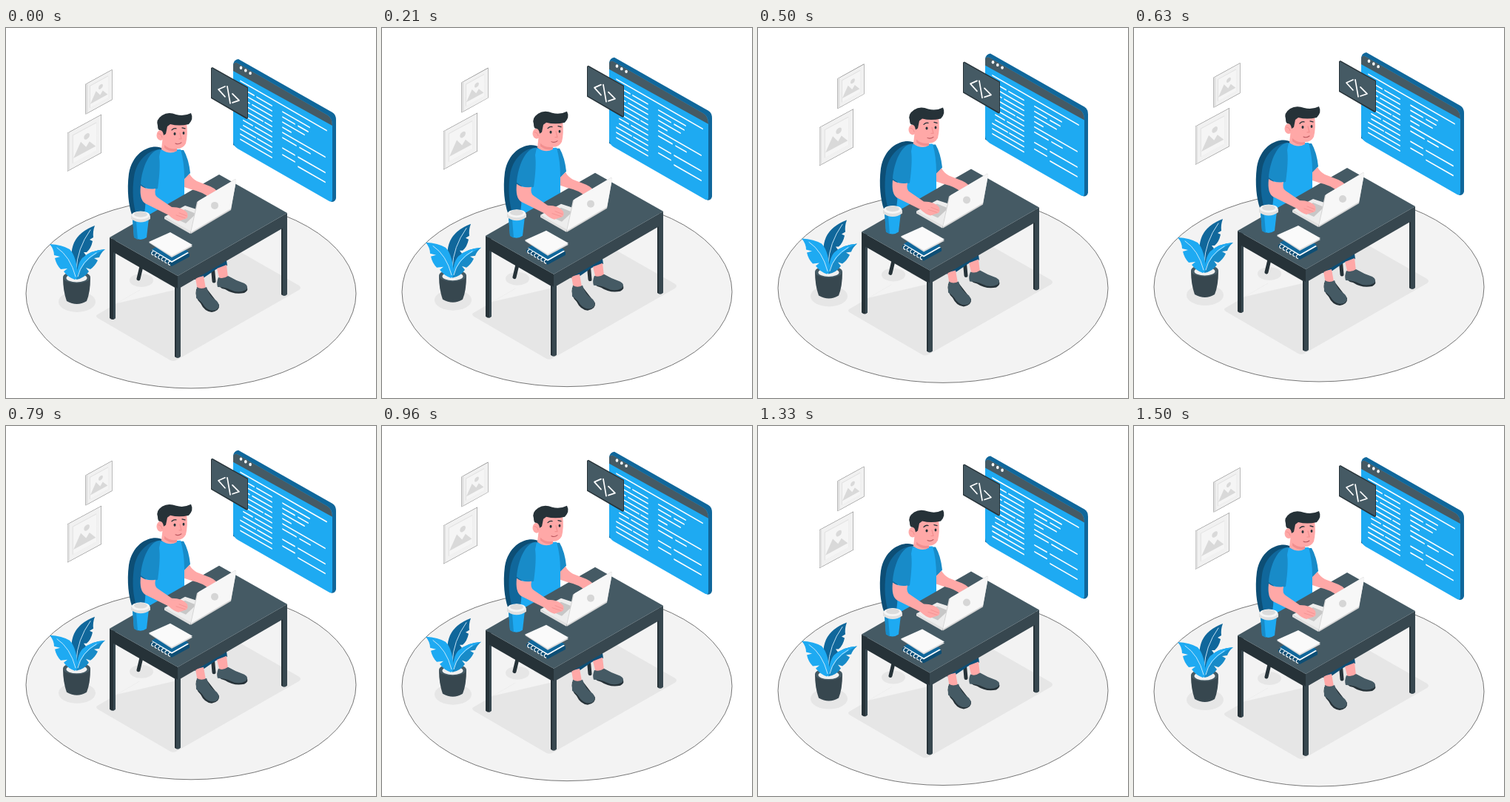
These frames come from a looping animation (500x500 px, 1.54 s). An HTML page with a canvas:

```html
<!DOCTYPE html>
<html lang="en">
<head>
<meta charset="utf-8">
<title>Desk scene</title>
<style>
html, body { margin: 0; width: 100%; height: 100%; overflow: hidden; background: #fff; }
canvas { display: block; width: 500px; height: 500px; }
</style>
</head>
<body>
<canvas id="stage" width="500" height="500"></canvas>
<script>
const ctx = document.getElementById('stage').getContext('2d');
const LOOP = 1540, STEPS = 37, RISE = 9.4, PEAK = 720;
const BLUE = '#1eaaf2', MID = '#188bc8', DEEP = '#10679b', NAVY = '#0d4e75';
const SLATE = '#455a64', DARK = '#37474f', INK = '#263238';
const SKIN = '#ffa8a7', BLUSH = '#f28f8f', SHADE = '#e6e6e6', GREY = '#e0e0e0';

function fill(color, d) {
  ctx.fillStyle = color;
  ctx.fill(new Path2D(d));
}

function line(color, width, d) {
  ctx.strokeStyle = color;
  ctx.lineWidth = width;
  ctx.lineCap = ctx.lineJoin = 'round';
  ctx.stroke(new Path2D(d));
}

function oval(color, x, y, rx, ry, turn = 0) {
  ctx.fillStyle = color;
  ctx.beginPath();
  ctx.ellipse(x, y, rx, ry, turn, 0, 2 * Math.PI);
  ctx.fill();
}

function floor() {
  oval('#f3f3f3', 250, 359, 223, 128);
  ctx.strokeStyle = '#555';
  ctx.lineWidth = 0.8;
  ctx.stroke();
  fill(SHADE, 'M124 387L288 291Q292 289 296 291L396 348Q400 351 396 354L230 449Q226 451 222 449L124 392Q120 389 124 387Z');
  fill('#f3f3f3', 'M150 372L181 354Q165 347 170 337L186 329L232 353Z');
  oval(SHADE, 183, 341, 16, 9);
  oval(SHADE, 96, 370, 25, 14);
}

// Wall picture, drawn as a sheared upright rectangle.
function picture(x, y, w, h, slope) {
  ctx.save();
  ctx.transform(1, slope, 0, 1, x, y);
  fill('#777', `M-.5 -.5H${w + .5}V${h + .5}H-.5Z`);
  fill('#f1f1f1', `M0 0H${w}V${h}H0Z`);
  fill(GREY, `M0 0H2.5V${h}H0Z`);
  const m = w * 0.14;
  fill(GREY, `M${m} ${m}H${w - m}V${h - m}H${m}Z`);
  fill('#f5f5f5', `M${m + 1} ${m + 1}H${w - m}V${h - m}H${m + 1}Z`);
  fill('#d9d9d9', `M${w * .17} ${h * .75}L${w * .39} ${h * .42}L${w * .55} ${h * .63}L${w * .65} ${h * .53}L${w * .84} ${h * .75}Z`);
  oval('#d9d9d9', w * .57, h * .36, w * .085, w * .085);
  ctx.restore();
}

const codeRows = [
  // [x, y before shear, length]
  [10, 20, 116],
  [10, 29, 18], [32, 29, 20], [10, 36, 42], [14, 43, 8], [26, 43, 26], [14, 50, 38],
  [10, 57, 30], [43, 57, 9], [10, 64, 42], [14, 71, 12], [30, 71, 22], [14, 78, 38],
  [10, 85, 20], [33, 85, 19], [10, 92, 42], [10, 99, 42],
  [67, 29, 36], [67, 36, 16], [88, 36, 13], [67, 43, 29], [67, 50, 11],
  [67, 57, 57], [67, 64, 18], [90, 64, 14], [67, 78, 16], [88, 78, 36],
  [67, 87, 16], [88, 91, 36]
];

function browser() {
  fill(DEEP, 'M307 49Q308 43 314 42L441 114Q446 117 446 124V230Q445 235 440 235L307 158Z');
  fill(BLUE, 'M307 50Q308 45 314 48L435 118Q441 122 441 131V231Q441 237 435 233L313 163Q307 159 307 153Z');
  fill(SLATE, 'M307 58V50Q308 45 314 48L435 118Q441 122 441 132Z');
  for (let i = 0; i < 3; i++) oval('#fff', 317.5 + i * 6.3, 53.8 + i * 3.7, 1.8, 2.2);
  ctx.save();
  ctx.transform(1, .575, 0, 1, 307, 46);
  for (const [x, y, length] of codeRows) line('#fff', 1.8, `M${x} ${y}h${length}`);
  ctx.restore();
  fill(INK, 'M277 54L279 53L327 80V122L325 123L277 95Z');
  fill(SLATE, 'M278 54L326 81V121.5L278 94Z');
  line('#fff', 1.7, 'M296 79L287 83L296 93M299 79L303 102M306 89L315 98L306 101');
}

function feet() {
  line(INK, 5, 'M184 318L179 339M279 320L281 342');
  fill(NAVY, 'M254 334L282 320L298 314L299 321L284 326L268 337L255 340Z');
  fill(SKIN, 'M285 325L298 320L300 337L289 341ZM256 338L267 335L270 352L259 355Z');
  fill(INK, 'M286 342Q285 351 296 353Q308 361 322 358Q329 354 325 349L301 336Z');
  fill(SLATE, 'M287 337Q293 340 300 335Q310 341 322 345Q329 349 324 354Q314 359 304 354Q296 350 286 350Q284 344 287 337Z');
  fill(INK, 'M257 353Q255 365 263 372Q268 383 278 384Q289 382 288 374L271 352Z');
  fill(SLATE, 'M258 350Q264 354 271 350Q274 362 285 369Q291 376 284 381Q275 384 268 376Q264 369 257 365Q256 357 258 350Z');
}

function chair() {
  fill(NAVY, 'M212 163C201 156 172 163 166 197C163 220 166 240 170 252L195 255V170Z');
  fill(DEEP, 'M214 165C200 160 177 174 173 201C170 221 172 239 176 252L200 252Z');
}

function torso() {
  fill(MID, 'M229 165L240 165Q247 177 249 196L241 205Z');
  fill(BLUE, 'M206 165L236 164Q241 182 241 203V229L208 252L187 252Q190 230 188 205Z');
  fill(MID, 'M209 164C194 164 184 188 182 211Q192 220 205 217Q209 188 207 174Z');
}

function head() {
  fill(SKIN, 'M212 146L231 158V166Q221 172 210 164Z');
  fill(BLUSH, 'M214 158Q221 165 231 163V166Q223 169 214 162Z');
  fill(SKIN, 'M213 132Q215 123 230 124L244 128Q246 144 243 156Q239 164 229 163Q217 161 213 151Z');
  oval(SKIN, 209, 145, 5.5, 7);
  line(BLUSH, 1, 'M206 143Q210 143 211 148');
  fill(INK, 'M205 132Q202 124 211 118Q219 113 230 117Q240 120 250 115Q254 123 247 130Q234 133 222 130L218 133L216 143L213 145Q212 138 208 138Q205 138 205 132Z');
  oval(INK, 228, 143, 1.5, 2);
  oval(INK, 240, 142, 1.4, 2);
  line(INK, 1.3, 'M224 138Q227 135 230 136M238 135L242 136');
  line(BLUSH, 1.2, 'M235 142L237 150L234 150');
  line('#bb5960', 1.1, 'M229 156Q233 158 237 155');
}

function desk() {
  fill(INK, 'M140 285H148V392Q144 396 140 392Z');
  fill(DARK, 'M145 296H148V392L145 394ZM372 262H380V360Q376 364 372 360Z');
  fill(INK, 'M372 262H374V361L372 360Z');
  fill(INK, 'M140 283L232 335V353L140 300Z');
  fill(DARK, 'M232 335L380 250V267L232 353Z');
  fill(SLATE, 'M140 283L288 198L380 250L232 335Z');
  fill(DARK, 'M228 349L232 352L236 349V444Q232 448 228 444Z');
  fill(INK, 'M228 349L230 351V445L228 444Z');
}

function armsAndLaptop() {
  fill(SKIN, 'M241 204L248 197Q251 203 258 207L276 214Q287 219 286 225L274 229Q267 222 250 218L241 215Z');
  fill('#ededed', 'M214 255L242 240L276 251L249 276Z');
  fill('#c7c7c7', 'M223 255L242 245L257 251L243 264Z');
  fill(GREY, 'M214 255L249 274V278L214 258Z');
  fill(SKIN, 'M182 213Q190 219 202 217Q200 226 205 229L224 242Q239 242 245 250Q247 257 242 258L233 261Q226 259 220 253L188 237Q180 232 182 213Z');
  line(BLUSH, .8, 'M230 253L242 257M234 250L244 254');
  fill('#d4d4d4', 'M249 277L258 235L310 204L311 206L304 246L250 278Z');
  fill('#f7f7f7', 'M250 276L259 236Q259 234 261 233L309 205Q311 204 311 207L304 244Z');
  oval('#d6d6d6', 282, 240, 5, 5);
}

function cup() {
  fill(BLUE, 'M171 257L193 257L190 283Q182 289 173 283Z');
  fill(MID, 'M171 258L176 261L178 286L173 283Z');
  fill(GREY, 'M169 254Q170 249 182 248Q194 249 195 254V258Q182 267 169 258Z');
  oval('#f5f5f5', 182, 253, 12, 5.5);
  oval('#dcdcdc', 182, 252, 9, 3.8);
}

function notebook() {
  fill(NAVY, 'M195 302L218 288L248 305V309L224 322L195 305Z');
  fill('#fff', 'M197 300L220 288L247 304L224 317Z');
  fill(DEEP, 'M197 299L220 287L247 302L224 315Z');
  for (let i = 0; i < 6; i++) line('#f5f5f5', 1.2, `M${199 + i * 4.5} ${302 + i * 2.7}q-3 1 -2 4l2 1`);
  fill('#d9d9d9', 'M193 290L222 277L252 295L224 310Z');
  fill('#fafafa', 'M193 289L222 276L252 293L224 308Z');
}

function plant() {
  fill(DEEP, 'M91 329Q85 306 92 290Q99 275 120 267Q117 275 118 283L113 286L117 288Q115 298 109 303L105 303L108 307Q103 316 100 333Z');
  line('#d5eefc', .9, 'M95 327Q96 298 114 273');
  fill(DARK, 'M77 337H114Q114 357 109 369Q96 377 82 369Q77 355 77 337Z');
  oval(SLATE, 95.5, 337, 18.5, 8);
  oval('#f0f0f0', 95.5, 338, 14, 5.5);
  fill(BLUE, 'M93 340Q84 337 78 329L83 325L74 326Q68 320 66 311L73 309L65 307Q65 299 59 292Q76 293 86 299Q96 309 97 338Z');
  fill(MID, 'M95 340Q96 319 103 311Q115 300 134 299Q128 304 126 310L119 311L124 314Q120 322 114 326L108 324L112 329Q106 338 95 340Z');
  fill(BLUE, 'M95 340Q96 319 103 311Q115 300 134 299Q102 313 95 340Z');
  line('#d5eefc', .9, 'M94 336Q87 309 69 297M97 336Q102 315 122 304');
}

function draw(time) {
  const step = Math.floor(time % LOOP / LOOP * STEPS);
  const phase = 2 * Math.PI * (step * LOOP / STEPS - PEAK) / LOOP;
  ctx.fillStyle = '#fff';
  ctx.fillRect(0, 0, 500, 500);
  ctx.save();
  ctx.translate(0, -RISE * (1 + Math.cos(phase)) / 2);
  floor();
  picture(108, 76, 35, 40, -.55);
  picture(83.5, 142, 45, 51, -.54);
  browser();
  feet();
  chair();
  torso();
  head();
  desk();
  armsAndLaptop();
  cup();
  notebook();
  plant();
  ctx.restore();
}

const start = performance.now();
function tick() {
  draw(performance.now() - start);
  requestAnimationFrame(tick);
}
tick();
</script>
</body>
</html>
```
